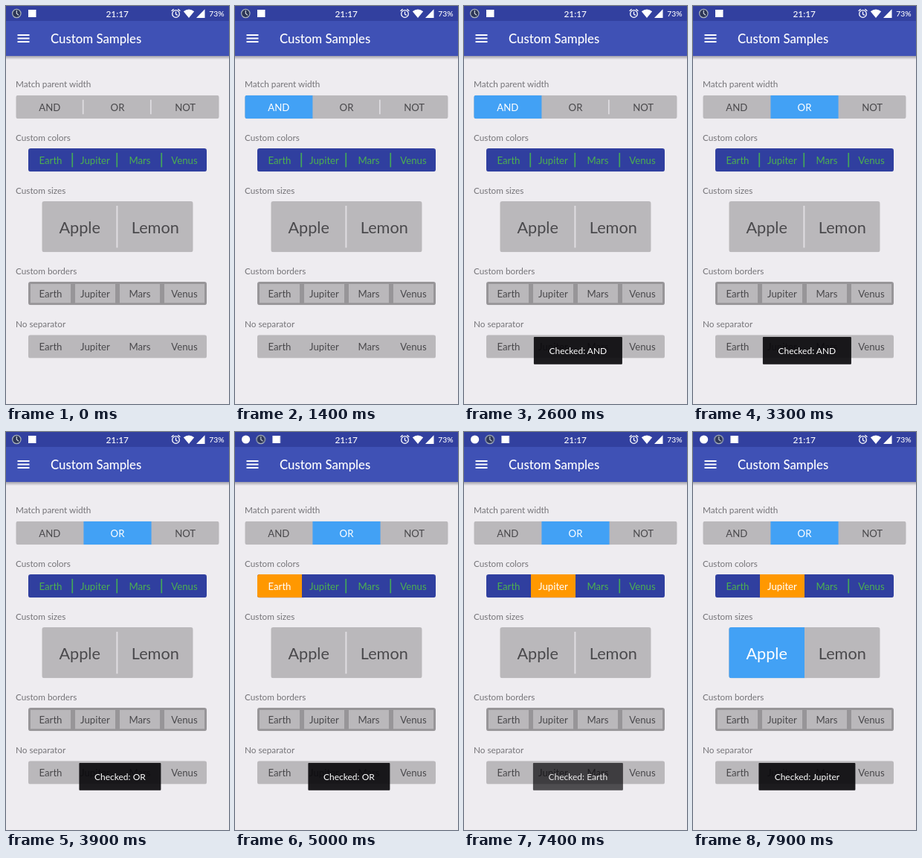
An HTML page that plays this animation: 300 px wide and 534 px high, repeating every 8000 ms.

```html
<!DOCTYPE html>
<html lang="en">
<head>
<meta charset="utf-8">
<title>Custom Samples</title>
<style>
  html, body { margin: 0; width: 100%; height: 100%; overflow: hidden; background: #eeecf0; }
  svg { display: block; width: 100vw; height: 100vh; font-family: Lato, sans-serif; }
  .mid { text-anchor: middle; }
  .loop { animation: 8s linear infinite; }
  .step { animation-timing-function: step-end; }
  #shift { animation-name: shift; }
  @keyframes shift {
    0% { transform: none; }
    53.7%, 100% { transform: translateX(20.4px); }
  }
</style>
</head>
<body>
<svg id="stage" viewBox="0 0 300 534">
  <defs>
    <linearGradient id="shade" x2="0" y2="1">
      <stop stop-color="#777684" stop-opacity=".65"/>
      <stop offset="1" stop-color="#777684" stop-opacity="0"/>
    </linearGradient>
  </defs>
  <rect width="300" height="534" fill="#eeecf0"/>
  <rect y="67" width="300" height="5" fill="url(#shade)"/>
  <rect width="300" height="67" fill="#3f51b5"/>
  <rect width="300" height="20" fill="#32409f"/>
  <path d="M15.5 39H31.5M15.5 43.5H31.5M15.5 48H31.5" stroke="#fff" stroke-width="1.8"/>
  <text x="60" y="50" font-size="16.8" font-weight="500" fill="#fff">Custom Samples</text>

  <g id="shift" class="loop step">
    <circle cx="14.3" cy="10" r="5.7" fill="#2c3556" stroke="#a9b3ba" stroke-width="1.2"/>
    <path d="M14.3 6V10L17 12.3" fill="none" stroke="#dfe5e6" stroke-width="1.1"/>
    <rect x="30" y="5" width="10.5" height="10" fill="#fff"/>
  </g>
  <text class="mid" x="149.7" y="14.5" font-size="11.9" font-weight="500" fill="#fff">21:17</text>
  <g fill="none" stroke="#fff" stroke-width="1.3">
    <circle cx="228.5" cy="10.5" r="4.8"/>
    <path d="M228.5 7.5V11L230.8 12.4M222.6 6.8L225.6 4.2M234.4 6.8L231.4 4.2"/>
  </g>
  <path d="M238.8 7.3Q246 1.5 253.2 7.3L246 16ZM256 16H267.5V4.2Z" fill="#fff"/>
  <text x="273.2" y="14" font-size="10.4" font-weight="500" fill="#fff">73%</text>
</svg>
<script>
const NS = 'http://www.w3.org/2000/svg', LOOP = 8000;
const stage = document.getElementById('stage');
const sheet = document.head.appendChild(document.createElement('style'));
let rules = 0;

function add(parent, tag, attrs, content) {
  const el = document.createElementNS(NS, tag);
  for (const key in attrs) el.setAttribute(key, attrs[key]);
  if (content) el.textContent = content;
  return parent.appendChild(el);
}
const rect = (parent, x, y, width, height, fill, rx = 0) =>
  add(parent, 'rect', { x, y, width, height, fill, rx });
const label = (parent, x, y, size, fill, str) =>
  add(parent, 'text', { x, y, fill, 'font-size': size, class: 'mid' }, str);

// Opacity over the loop, as [ms, value] stops.
function fade(el, stops, stepped) {
  const name = 'fade' + rules++;
  const body = stops.map(([ms, v]) => `${ms / LOOP * 100}% { opacity: ${v} }`).join(' ');
  sheet.append(`@keyframes ${name} { ${body} }\n`);
  el.setAttribute('class', stepped ? 'loop step' : 'loop');
  el.style.animationName = name;
}
const show = (el, from, to) =>
  fade(el, [[0, 0], [from, 1], ...(to ? [[to, 0]] : []), [LOOP, to ? 0 : 1]], true);

// checked: [item, from, to] in ms
function row({ title, titleY, x, y, w, h, items, size = 13.2, base, sep, bg = '#bab8bb',
               ink = '#4a494c', on = '#42a1f5', inset = 6, sepW = 1.7, border, checked = [] }) {
  add(stage, 'text', { x: 13, y: titleY, 'font-size': 11.75, fill: '#757478' }, title);
  const id = 'row' + y, cell = w / items.length;
  add(add(stage, 'clipPath', { id }), 'rect', { x, y, width: w, height: h, rx: 3.2 });
  const g = add(stage, 'g', { 'clip-path': `url(#${id})` });
  rect(g, x, y, w, h, border || bg);
  items.forEach((str, i) => {
    const left = x + i * cell;
    if (border) rect(g, left + 3, y + 3, cell - 6, h - 6, bg);
    if (sep && i) rect(g, left - 1.6, y + inset, sepW, h - 2 * inset, sep);
    label(g, left + cell / 2, base, size, ink, str);
  });
  for (const [i, from, to] of checked) {
    const left = x + i * cell, over = add(g, 'g');
    rect(over, left - 3, y, cell + 6, h, bg);   // hides both separators
    rect(over, left, y, cell, h, on);
    label(over, left + cell / 2, base, size, '#fff', items[i]);
    show(over, from, to);
  }
}

function toast(str, width, start, end) {
  const g = add(stage, 'g');
  rect(g, 153.4 - width / 2, 444, width, 36.7, 'rgba(10,9,12,.92)', 1);
  label(g, 153.4, 467.2, 12, '#fff', 'Checked: ' + str);
  const tail = end ? [[end, 1], [end + 300, 0], [LOOP, 0]] : [[LOOP, 1]];
  fade(g, [[0, 0], [start, 0], [start + 300, 1], ...tail]);
}

const planets = ['Earth', 'Jupiter', 'Mars', 'Venus'];
const strip = { x: 30, w: 240, h: 31.3, items: planets };

row({ title: 'Match parent width', titleY: 109.3, x: 13.3, y: 119.8, w: 273.4, h: 31.4,
      items: ['AND', 'OR', 'NOT'], base: 140.6, sep: '#dfdde1',
      checked: [[0, 1390, 2790], [1, 2790]] });
row({ ...strip, title: 'Custom colors', titleY: 180.6, y: 191, base: 211.8, bg: '#303f9f',
      ink: '#4caf50', sep: '#43a65a', on: '#ff9800', checked: [[0, 4590, 5990], [1, 5990]] });
row({ title: 'Custom sizes', titleY: 251.7, x: 48.3, y: 262, w: 203.4, h: 68.3,
      items: ['Apple', 'Lemon'], size: 21.7, base: 305, sep: '#dfdde1', sepW: 2,
      checked: [[0, 7590]] });
row({ ...strip, title: 'Custom borders', titleY: 359.8, y: 370, base: 390.8, border: '#979598' });
row({ ...strip, title: 'No separator', titleY: 430.8, y: 441.3, base: 462 });

show(add(stage, 'circle', { cx: 14.6, cy: 10, r: 5.6, fill: '#fff' }), 4290);

toast('AND', 119, 1530, 3400);
toast('OR', 110, 3590, 5330);
toast('Earth', 121, 5600, 7330);
toast('Jupiter', 130, 7590);
</script>
</body>
</html>
```
